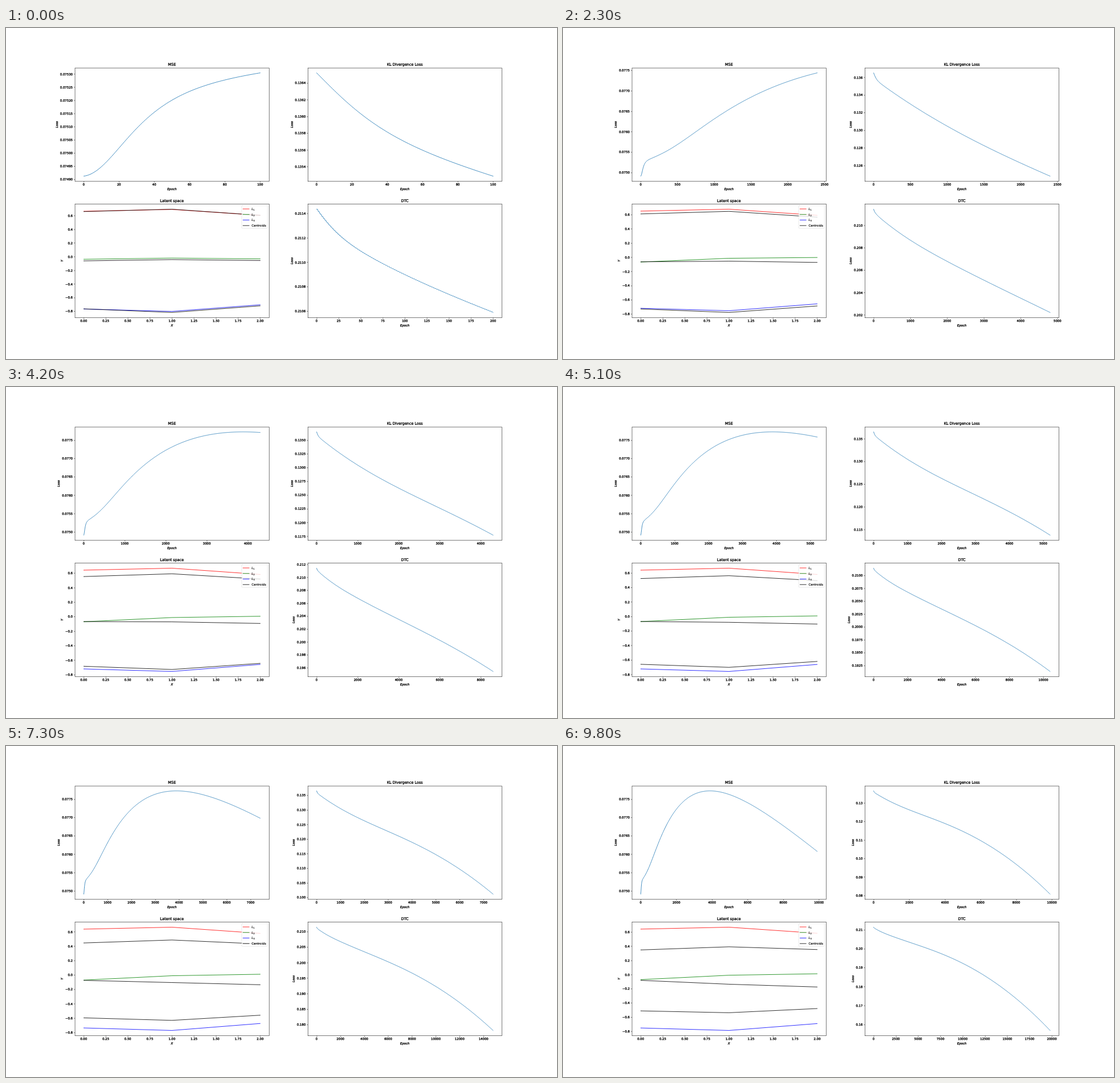
These frames come from a looping animation (966x580 px, 9.9 s). An HTML page with a canvas:

```html
<!DOCTYPE html>
<html lang="en">
<head>
<meta charset="utf-8">
<title>Training curves</title>
<style>
  html, body { margin: 0; width: 100%; height: 100%; overflow: hidden; background: #fff; }
  canvas { display: block; width: 966px; height: 580px; }
</style>
</head>
<body>
<canvas id="stage" width="966" height="580"></canvas>
<script>
// Layout is in points of a 25 x 15 in figure, scaled down to the stage.
const W = 1800, H = 1080, STEP_MS = 100, STEPS = 99;
const ctx = document.getElementById('stage').getContext('2d');
ctx.scale(966 / W, 580 / H);
ctx.textRendering = 'geometricPrecision';

const { exp, tanh, cosh, atan } = Math;
const gd = x => 2 * atan(tanh(x / 2));

// Loss models: a quick transient over the first epochs, then a slow drift.
function mse(e) {
  const k = e / 1000;
  return (75238 - 326 / cosh(e / 23.4)
    - 401 * k + 5600 * (1 - exp(-k / 2)) - 750 * tanh(k / 0.47)) / 1e6;
}
function kl(e) {
  const k = e / 1000;
  return (136522 - 410 * gd(e / 27)
    - 862 * k - 191.6 * k ** 2.3 - 9240 * (1 - exp(-k * (0.58 + 0.057 * k)))) / 1e6;
}
// Two updates per epoch; only every second one lowers the joint loss.
const dtc = i => mse(Math.floor(i / 2)) + kl(Math.floor(i / 2));

// Latent lines in thousandths at x = 0, 1, 2; k counts thousands of epochs.
const settle = (end, offset, tau) => k => end + offset * exp(-k / tau);
const drift = (from, to, power) => k => from + (to - from) * (k / 9.9) ** power;
const latents = [
  ['#f00', [637, 664, 578].map(v => k => v + 0.56 * (k - 7) ** 2)],
  ['#008000', [settle(-71, 36, 1), settle(-8, -13, 4), settle(12, -47, 2.2)]],
  ['#00f', [-713, -748, -651].map(v => k => v - 0.41 * k * k - 60 * exp(-k / 0.8))],
  ['#000', [drift(660, 348, 1.28), drift(695, 392, 1.28), drift(605, 353, 1.28)]],
  ['#000', [drift(-62, -81, 1.4), drift(-43, -136, 1.4), drift(-57, -175, 1.4)]],
  ['#000', [drift(-764, -512, 1.38), drift(-817, -538, 1.38), drift(-720, -479, 1.38)]],
];

const axW = W * 0.775 / 2.2, axH = H * 0.755 / 2.2;
const panel = (col, row) => ({ x: W * 0.125 + col * axW * 1.2, y: H * 0.12 + row * axH * 1.2 });
const snap = v => Math.round(v) + 0.5;

function text(str, x, y, { size = 10, align = 'center', style = '', turn = 0, weight = 0.6 } = {}) {
  ctx.save();
  ctx.translate(x, y);
  ctx.rotate(turn);
  ctx.font = `${style} ${size}px "DejaVu Sans", sans-serif`;
  ctx.textAlign = align;
  ctx.fillStyle = ctx.strokeStyle = '#000';
  ctx.lineWidth = weight;
  ctx.lineJoin = 'round';
  ctx.fillText(str, 0, 0);
  ctx.strokeText(str, 0, 0);
  ctx.restore();
}

function line(points, color, width = 1.5, cap = 'square') {
  ctx.beginPath();
  for (const [x, y] of points) ctx.lineTo(x, y);
  ctx.strokeStyle = color;
  ctx.lineWidth = width;
  ctx.lineCap = cap;
  ctx.lineJoin = 'round';
  ctx.stroke();
}

function ticks(lo, hi) {
  const raw = (hi - lo) / 9, mag = 10 ** Math.floor(Math.log10(raw));
  const step = mag * [1, 2, 2.5, 5, 10].find(m => m * mag >= raw * (1 - 1e-9));
  let digits = 0;
  while (Math.abs(step * 10 ** digits - Math.round(step * 10 ** digits)) > 1e-6) digits++;
  const out = [];
  for (let i = Math.ceil(lo / step); i <= Math.floor(hi / step); i++) {
    out.push({ v: i * step, label: (i * step).toFixed(digits).replace('-', '\u2212') });
  }
  return out;
}

// Data range of one coordinate with a 5% margin on both sides.
function limits(points, axis) {
  const values = points.map(p => p[axis]);
  const lo = Math.min(...values), hi = Math.max(...values), pad = (hi - lo) * 0.05;
  return [lo - pad, hi + pad];
}

function plot(box, title, xLabel, yLabel, series) {
  const all = series.flatMap(s => s.points);
  const [x0, x1] = limits(all, 0), [y0, y1] = limits(all, 1);
  const px = v => box.x + (v - x0) / (x1 - x0) * axW;
  const py = v => box.y + (y1 - v) / (y1 - y0) * axH;
  const left = snap(box.x), right = snap(box.x + axW);
  const top = snap(box.y), bottom = snap(box.y + axH);
  const midX = box.x + axW / 2, baseY = box.y + axH;

  for (const { v, label } of ticks(x0, x1)) {
    const x = snap(px(v));
    line([[x, bottom], [x, bottom + 3.5]], '#000', 1, 'butt');
    text(label, px(v), baseY + 14.6);
  }
  let widest = 0;
  ctx.font = '10px "DejaVu Sans", sans-serif';
  for (const { v, label } of ticks(y0, y1)) {
    const y = snap(py(v));
    line([[left - 3.5, y], [left, y]], '#000', 1, 'butt');
    text(label, box.x - 7, py(v) + 3.65, { align: 'right' });
    widest = Math.max(widest, ctx.measureText(label).width);
  }
  for (const s of series) line(s.points.map(([x, y]) => [px(x), py(y)]), s.color);

  ctx.strokeStyle = '#000';
  ctx.lineWidth = 1;
  ctx.lineJoin = 'miter';
  ctx.strokeRect(left, top, right - left, bottom - top);

  text(title, midX, box.y - 6, { size: 12 });
  text(xLabel, midX, baseY + 29.5, { style: 'italic' });
  text(yLabel, box.x - widest - 14.2, box.y + axH / 2, { style: 'italic', turn: -Math.PI / 2 });
}

function legend(box) {
  const w = 84, h = 74, x = box.x + axW - 5 - w, y = box.y + 5;
  ctx.globalAlpha = 0.8;
  ctx.beginPath();
  ctx.roundRect(x, y, w, h, 2);
  ctx.fillStyle = '#fff';
  ctx.fill();
  ctx.strokeStyle = '#ccc';
  ctx.lineWidth = 1;
  ctx.stroke();
  ctx.globalAlpha = 1;
  for (let i = 0; i < 4; i++) {
    const ly = y + 11 + 18.1 * i, tx = x + 32;
    const look = { align: 'left', weight: 0.25 };
    line([[x + 4, ly], [x + 24, ly]], latents[i][0]);
    if (i === 3) {
      text('Centroids', tx, ly + 3.6, look);
    } else {
      text('L', tx, ly + 3.6, { ...look, style: 'italic' });
      text(String(i + 1), tx + 5.8, ly + 5.2, { ...look, size: 7 });
    }
  }
}

function sample(f, last) {
  const step = Math.max(1, Math.floor(last / 600)), points = [];
  for (let i = 0; i < last; i += step) points.push([i, f(i)]);
  points.push([last, f(last)]);
  return [{ color: '#1f77b4', points }];
}

function draw(n) {
  ctx.fillStyle = '#fff';
  ctx.fillRect(0, 0, W, H);
  plot(panel(0, 0), 'MSE', 'Epoch', 'Loss', sample(mse, n));
  plot(panel(1, 0), 'KL Divergence Loss', 'Epoch', 'Loss', sample(kl, n));
  plot(panel(1, 1), 'DTC', 'Epoch', 'Loss', sample(dtc, 2 * n));
  plot(panel(0, 1), 'Latent space', 'X', 'Y', latents.map(([color, fs]) => ({
    color, points: fs.map((f, x) => [x, f(n / 1000) / 1000]),
  })));
  legend(panel(0, 1));
}

let shown = -1;
function tick() {
  const k = Math.floor(performance.now() / STEP_MS) % STEPS;
  if (k !== shown) {
    shown = k;
    draw(100 * (k + 1));
  }
  requestAnimationFrame(tick);
}
tick();
</script>
</body>
</html>
```
